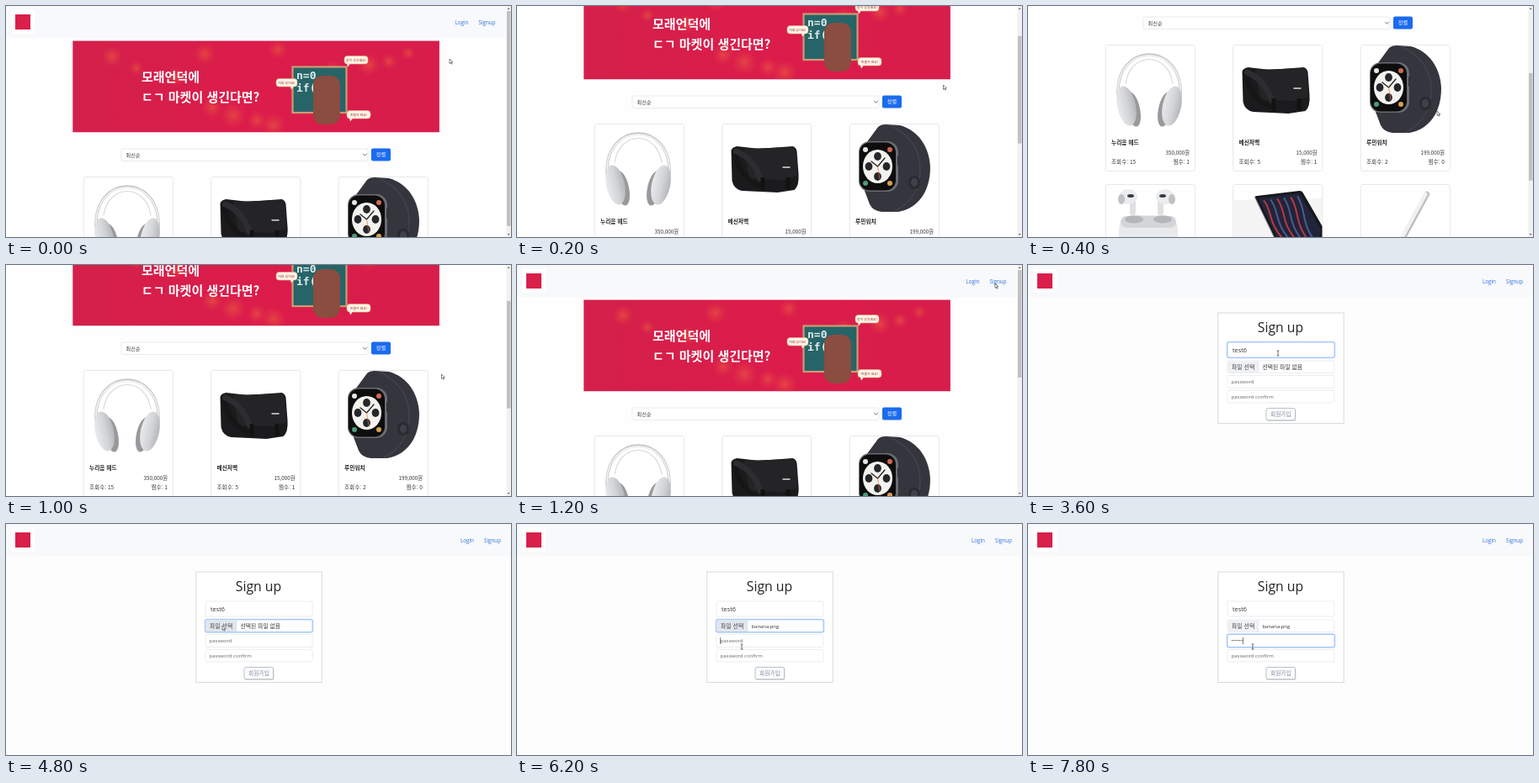
An HTML page for the animation above (8 s loop, 600 by 275 pixels).

```html
<!DOCTYPE html>
<html lang="ko">
<head>
<meta charset="utf-8">
<title>Market sign up</title>
<style>
html, body { margin: 0; width: 100%; height: 100%; overflow: hidden; background: #fdfdfe; }
svg { display: block; width: 100%; height: 100%; }
text { font-family: "Open Sans", "Noto Sans CJK KR", "Noto Sans CJK", sans-serif; white-space: pre; }
.ko { font-family: "Noto Sans CJK KR", "Noto Sans CJK", sans-serif; }
.code { font: 700 13px "DejaVu Sans Mono", monospace; }
.field { fill: #fff; stroke: #e3e6ea; stroke-width: .7; }
.field.on { stroke: #8db8f8; }
.ring { fill: none; stroke: #bdd5fb; stroke-width: 1.6; visibility: hidden; }
.ring.on { visibility: visible; }
</style>
</head>
<body>
<svg id="stage" viewBox="0 0 600 275" preserveAspectRatio="none"></svg>
<script>
const LOOP = 8000, STEP = 200;
const stage = document.getElementById('stage');
const $ = id => document.getElementById(id);

const rect = (x, y, w, h, fill, more = '') =>
  `<rect x="${x}" y="${y}" width="${w}" height="${h}" fill="${fill}" ${more}/>`;
const text = (x, y, size, s, fill = '#333', more = '') =>
  `<text x="${x}" y="${y}" font-size="${size}" fill="${fill}" ${more}>${s}</text>`;
const ko = (x, y, size, s, fill = '#333', more = '') =>
  text(x, y, size, s, fill, 'class="ko" ' + more);
const path = (d, fill, more = '') => `<path d="${d}" fill="${fill}" ${more}/>`;
const ellipse = (x, y, rx, ry, fill, more = '') =>
  `<ellipse cx="${x}" cy="${y}" rx="${rx}" ry="${ry}" fill="${fill}" ${more}/>`;
const line = (d, color, w) =>
  path(d, 'none', `stroke="${color}" stroke-width="${w}" stroke-linecap="round"`);
const END = 'text-anchor="end"', MID = 'text-anchor="middle"';

const navbar = (width, loginX) =>
  rect(0, 0, width, 38, '#f8f9fb') + rect(7, 5, 27, 28, '#fff') +
  rect(11, 10, 18, 18, '#d8204a') +
  text(loginX, 22, 6.3, 'Login', '#2d70df') + text(loginX + 28, 22, 6.3, 'Signup', '#2d70df');

function bubble(x, y, w, s, tail) {
  return rect(x, y, w, 9.5, '#fff4e6', 'rx="3.5" stroke="#e9b07c" stroke-width=".6"') +
    path(`M${x + tail} ${y + 9}l4 0l-3 4z`, '#fff4e6') +
    ko(x + w / 2, y + 6.4, 3.9, s, '#9a3a3a', MID);
}

function banner() {
  const glow = [[126, 60, 13], [155, 74, 9], [202, 84, 12], [236, 57, 14], [245, 121, 13], [270, 130, 16],
    [298, 136, 12], [318, 142, 15], [323, 52, 12], [388, 76, 12], [431, 70, 14], [455, 66, 10], [478, 56, 9]];
  return `<g clip-path="url(#bannerClip)">` + rect(79, 41, 436, 110, 'url(#red)') +
    glow.map(([x, y, r]) => ellipse(x, y, r, r, 'url(#bokeh)')).join('') + '</g>' +
    ko(161, 90, 15, '모래언덕에', '#fff', 'font-weight="700"') +
    ko(161, 114, 15, 'ㄷㄱ 마켓이 생긴다면?', '#fff', 'font-weight="700"') +
    rect(340.5, 72.5, 64, 54.5, '#276468', 'stroke="#c99c74" stroke-width="2.2"') +
    '<text class="code" fill="#dcebea" x="345" y="87">n=0</text>' +
    '<text class="code" fill="#dcebea" x="345" y="102">if(</text>' +
    rect(365, 83, 32, 58, '#8a4d40', 'rx="11"') +
    bubble(402, 59.5, 28, '같이 공부해요!', 3) + bubble(321, 86.5, 25, '자료 있어요!', 17) +
    bubble(405, 124.5, 28, '만들어 봐요!', 3);
}

const headphones = () =>
  line('M15 60C12 -4 92 -4 89 60', '#c4c6c9', 3.4) + line('M15 58C13 -2 91 -2 89 58', '#f1f1f2', 1.8) +
  line('M24 46C30 8 74 8 80 46', '#d6d8da', 1.2) +
  ellipse(33, 77, 8, 21, '#98999c', 'transform="rotate(-12 33 77)"') +
  ellipse(71, 77, 8, 21, '#98999c', 'transform="rotate(12 71 77)"') +
  ellipse(25, 73, 11, 24, 'url(#silver)', 'transform="rotate(-12 25 73)"') +
  ellipse(79, 73, 11, 24, 'url(#silver)', 'transform="rotate(12 79 73)"');

const bag = () =>
  path('M11 32Q12 28 18 27L44 30L84 27Q88 28 89 33L91 60Q92 74 86 79L66 82L24 80Q14 78 12 68Z', '#1b1b1d') +
  path('M26 30L86 28Q91 48 89 62L76 67L33 66Z', '#242426') +
  line('M15 34C18 54 28 66 43 74', '#161617', 6) +
  line('M17 33C32 39 40 50 46 66', '#2d2d30', 7) +
  rect(46, 64, 5, 15, '#121213') + rect(76, 64, 5, 14, '#121213') + rect(72, 51, 9, 2, '#b0b0b0');

const watch = () =>
  path('M20 23L34 4Q37 1 43 1L60 2C82 8 95 28 96 52C96 80 82 101 58 105L38 105Q28 104 24 96L18 80Z', '#34353d') +
  path('M50 3C72 14 84 30 84 54C84 76 74 94 54 104', 'none', 'stroke="#41424b" stroke-width="1.5"') +
  ellipse(77, 70, 7, 8, '#2a2b31') + ellipse(77, 70, 4, 5, '#3f404a') +
  rect(11, 21, 47, 60, '#6b6d72', 'rx="13"') + rect(12, 22.5, 43, 57, '#0d0d0e', 'rx="12"') +
  ellipse(33.5, 51, 17.5, 20, '#f3f2ee') +
  [[33.5, 39], [33.5, 63], [23, 51], [44, 51]].map(([x, y]) => ellipse(x, y, 4.4, 5, '#26272b')).join('') +
  [[19, 31], [48, 31], [19, 71], [48, 71]].map(([x, y], i) =>
    ellipse(x, y, 3, 3, ['#e6e6e6', '#d06a50', '#4c9b78', '#d8a04c'][i])).join('') +
  line('M33.5 51L26 45M33.5 51L42 41', '#222', 1.3) + line('M33.5 51L36 66', '#e87834', .7) +
  rect(57, 38, 3, 12, '#33353a', 'rx="1.2"');

function buds() {
  const bud = (x, flip) => `<g transform="translate(${x} 6) scale(${flip} 1)">` +
    rect(2, 9, 7, 22, '#dfe0e2', 'rx="3"') + ellipse(0, 9, 11, 9, '#ebecee') +
    ellipse(-8, 12, 4, 6, '#bfc1c4') + ellipse(3, 8, 4, 2, '#3c3d40') + '</g>';
  return rect(16, 37, 70, 58, '#e9eaeb', 'rx="17"') + rect(18, 38, 66, 14, '#d3d5d8', 'rx="7"') +
    ellipse(34, 42, 11, 4.5, '#b4b6ba') + ellipse(68, 42, 11, 4.5, '#b4b6ba') +
    bud(27, 1) + bud(71, -1);
}

const tablet = () =>
  path('M1 19L106 17L106 105L1 105Z', '#f4f4f5') +
  path('M26 15Q27 14 29 14L79 8Q82 8 83 10L106 50V105H69Z', '#17181f') +
  path('M30 17L79 11L104 53V103H71Z', '#222438') +
  [0, 1, 2, 3, 4, 5].map(i =>
    line(`M${37 + i * 8} ${20 - i}C${48 + i * 8} 34 ${40 + i * 8} 46 ${64 + i * 7} 70`,
      ['#b83848', '#4a5a94'][i % 2], 2)).join('') +
  line('M26 16L69 105', '#8e9299', 1);

const pencil = () =>
  line('M79 12L36 91', '#bcbec1', 6.5) + line('M77.5 12L34.5 91', '#f1f1f2', 4.5) +
  path('M31 89L39 93L28 104Z', '#d9dadc');

function card(x, y, art, name, price, views, likes) {
  const info = name ? ko(7, 119, 6.7, name, '#222', 'font-weight="700"') +
    ko(100, 131, 6.3, price + '원', '#333', END) +
    ko(7, 142, 6.6, '조회수: ' + views) + ko(100, 142, 6.6, '찜수: ' + likes, '#333', END) : '';
  return `<g transform="translate(${x} ${y})">` +
    rect(.3, .5, 106, 150, '#fff', 'rx="2.5" stroke="#dcdee1" stroke-width=".7"') + art() + info + '</g>';
}

const home = () => `<g id="home">` + rect(0, 0, 600, 275, '#fefefe') + '<g id="page">' +
  navbar(594, 533.5) + banner() +
  rect(137, 170, 293, 14.5, '#fff', 'rx="2" stroke="#dee2e6" stroke-width=".7"') +
  ko(142.5, 179.6, 6.2, '최신순') + line('M424.5 176.2l2 2l2 -2', '#444', .8) +
  rect(434, 169.5, 23, 15, '#1b6bef', 'rx="2"') + ko(445.5, 179.4, 6.2, '정렬', '#fff', MID) +
  card(92, 203, headphones, '누리음 헤드', '350,000', 15, 1) +
  card(243.5, 203, bag, '메신저백', '15,000', 5, 1) +
  card(395, 203, watch, '루민워치', '199,000', 2, 0) +
  card(92, 369, buds) + card(243.5, 369, tablet) + card(395, 369, pencil) + '</g>' +
  rect(594.5, 0, 5.5, 275, '#f1f1f1') + path('M595.8 4l1.4 -2l1.4 2z', '#666') +
  path('M595.8 271l1.4 2l1.4 -2z', '#666') +
  rect(595, 6, 4.5, 128, '#c1c1c1', 'id="thumb"') + '</g>';

const field = (id, y, h) =>
  rect(236.5, y - .5, 128, h + 1, 'none', `id="${id}Ring" class="ring" rx="2.5"`) +
  rect(237, y, 127, h, '#fff', `id="${id}Box" class="field" rx="2"`);

const signup = () => `<g id="signup">` + rect(0, 0, 600, 275, '#fdfdfe') + navbar(600, 540) +
  rect(225.8, 57, 149.4, 131.5, '#fff', 'stroke="#d3d8d6" stroke-width=".9"') +
  text(300, 80, 15.8, 'Sign up', '#222', MID) +
  field('user', 92, 18) + text(243, 104.2, 7.3, '', '#333', 'id="userText"') +
  field('file', 114, 14.5) +
  path('M239 114.4H274V128.1H239Q237.4 128.1 237.4 126.5V116Q237.4 114.4 239 114.4Z', '#eff1f5', 'id="pick"') +
  line('M274 114.5V128', '#dde1e6', .6) + ko(242, 123.6, 6.9, '파일 선택', '#444') +
  '<text id="fileText" x="278.5" y="123.6" fill="#333"></text>' +
  field('pass', 131.5, 15) + text(241.5, 141.4, 6, '', '#333', 'id="passText"') +
  field('again', 149.5, 14.5) + text(241.5, 159.3, 6, 'password confirm', '#60666c') +
  rect(283.5, 171.5, 35, 14.5, '#dcdcde', 'rx="2"') +
  rect(283, 170.5, 34.5, 14.3, '#fafbfc', 'rx="2" stroke="#aeb1b5" stroke-width=".8"') +
  ko(300.3, 180.3, 6.7, '회원가입', '#8390a3', MID) +
  rect(0, 0, .6, 8, '#222', 'id="caret"') + '</g>';

stage.innerHTML = `<defs>
  <clipPath id="bannerClip"><rect x="79.3" y="41.4" width="435.6" height="108.8"/></clipPath>
  <linearGradient id="red"><stop stop-color="#d3204a"/><stop offset=".5" stop-color="#dc1c4b"/>
    <stop offset="1" stop-color="#d71d4b"/></linearGradient>
  <linearGradient id="silver"><stop stop-color="#e9eaeb"/><stop offset=".55" stop-color="#d2d4d6"/>
    <stop offset="1" stop-color="#b4b6b9"/></linearGradient>
  <radialGradient id="bokeh"><stop stop-color="#ee6c3e" stop-opacity=".5"/>
    <stop offset=".5" stop-color="#e84a41" stop-opacity=".34"/>
    <stop offset="1" stop-color="#e03a45" stop-opacity="0"/></radialGradient></defs>` +
  home() + signup() + `<g id="cursor">` +
  path('M0 0V5.4L1.3 4.2L2.2 6.2L3.1 5.8L2.2 3.9H3.9Z', '#fff', 'id="arrow" stroke="#222" stroke-width=".55"') +
  path('M-1.3 -3H1.3M0 -3V3M-1.3 3H1.3', 'none', 'id="beam" stroke="#333" stroke-width=".7"') + '</g>';

// Keys are [time, ...values]; values between keys are linear.
const scrollKeys = [[0, 0], [200, 63], [400, 157], [600, 189], [800, 150], [1000, 78], [1200, 0]];
const mouseKeys = [[0, 527, 63], [400, 486, 125], [800, 497, 130], [1000, 517.5, 130], [1200, 568, 22],
  [1400, 558, 24], [1600, 393, 83.5], [1800, 325, 100], [2200, 297, 105], [3800, 297, 105],
  [4400, 258, 121], [5200, 256, 121], [6000, 267, 146]];

function at(keys, t) {
  const i = keys.findIndex(k => k[0] > t);
  if (i < 0) return keys[keys.length - 1].slice(1);
  const a = keys[i - 1], b = keys[i], p = (t - a[0]) / (b[0] - a[0]);
  return a.slice(1).map((v, n) => v + (b[n + 1] - v) * p);
}

const typed = (t, start, max) => Math.max(0, Math.min(max, Math.floor((t - start) / 200) + 1));
const show = (id, on) => $(id).setAttribute('visibility', on ? 'inherit' : 'hidden');

function setText(id, value, hint) {
  $(id).textContent = value || hint;
  $(id).setAttribute('fill', value ? '#333' : '#60666c');
}

function drawForm(t) {
  const focus = t < 4400 ? 'user' : t < 6400 ? 'file' : 'pass';
  for (const id of ['user', 'file', 'pass']) {
    $(id + 'Box').classList.toggle('on', id === focus);
    $(id + 'Ring').classList.toggle('on', id === focus);
  }
  const chars = typed(t, 2200, 5), dots = typed(t, 6800, 6), picked = t >= 5200;
  setText('userText', 'test6'.slice(0, chars), 'username');
  setText('passText', '•'.repeat(dots), 'password');
  $('fileText').textContent = picked ? 'banana.png' : '선택된 파일 없음';
  $('fileText').setAttribute('class', picked ? '' : 'ko');
  $('fileText').setAttribute('font-size', picked ? 5.9 : 6.8);
  $('pick').setAttribute('fill', focus === 'file' ? '#e2e6ed' : '#eff1f5');

  const inUser = t < 4400, count = inUser ? chars : dots;
  const since = t - (inUser ? (count ? 2000 + count * 200 : 1400) : (count ? 6600 + count * 200 : 6200));
  const label = $(inUser ? 'userText' : 'passText');
  $('caret').setAttribute('x', +label.getAttribute('x') + (count ? label.getComputedTextLength() : 0));
  $('caret').setAttribute('y', inUser ? 97 : 135);
  show('caret', since >= 0 && since % 1000 < 500);
}

function draw(t) {
  const atHome = t < 1400, [scroll] = at(scrollKeys, t), [x, y] = at(mouseKeys, t);
  $('home').style.display = atHome ? '' : 'none';
  $('signup').style.display = atHome ? 'none' : '';
  if (atHome) {
    $('page').setAttribute('transform', `translate(0 ${-scroll})`);
    $('thumb').setAttribute('y', 6 + scroll * .47);
    // The page is still short until its lower rows have loaded.
    $('thumb').setAttribute('height', t < 200 ? 256 : 128);
  } else drawForm(t);
  const inField = (top, bottom) => y > top && y < bottom;
  const beam = !atHome && x > 237 && x < 364 && (inField(92, 110) || inField(131, 147));
  show('arrow', !beam);
  show('beam', beam);
  $('cursor').setAttribute('transform', `translate(${x} ${y})`);
}

const begin = performance.now();
function tick() {
  const t = (performance.now() - begin) % LOOP;
  draw(Math.floor(t / STEP) * STEP);
  requestAnimationFrame(tick);
}
tick();
</script>
</body>
</html>
```
